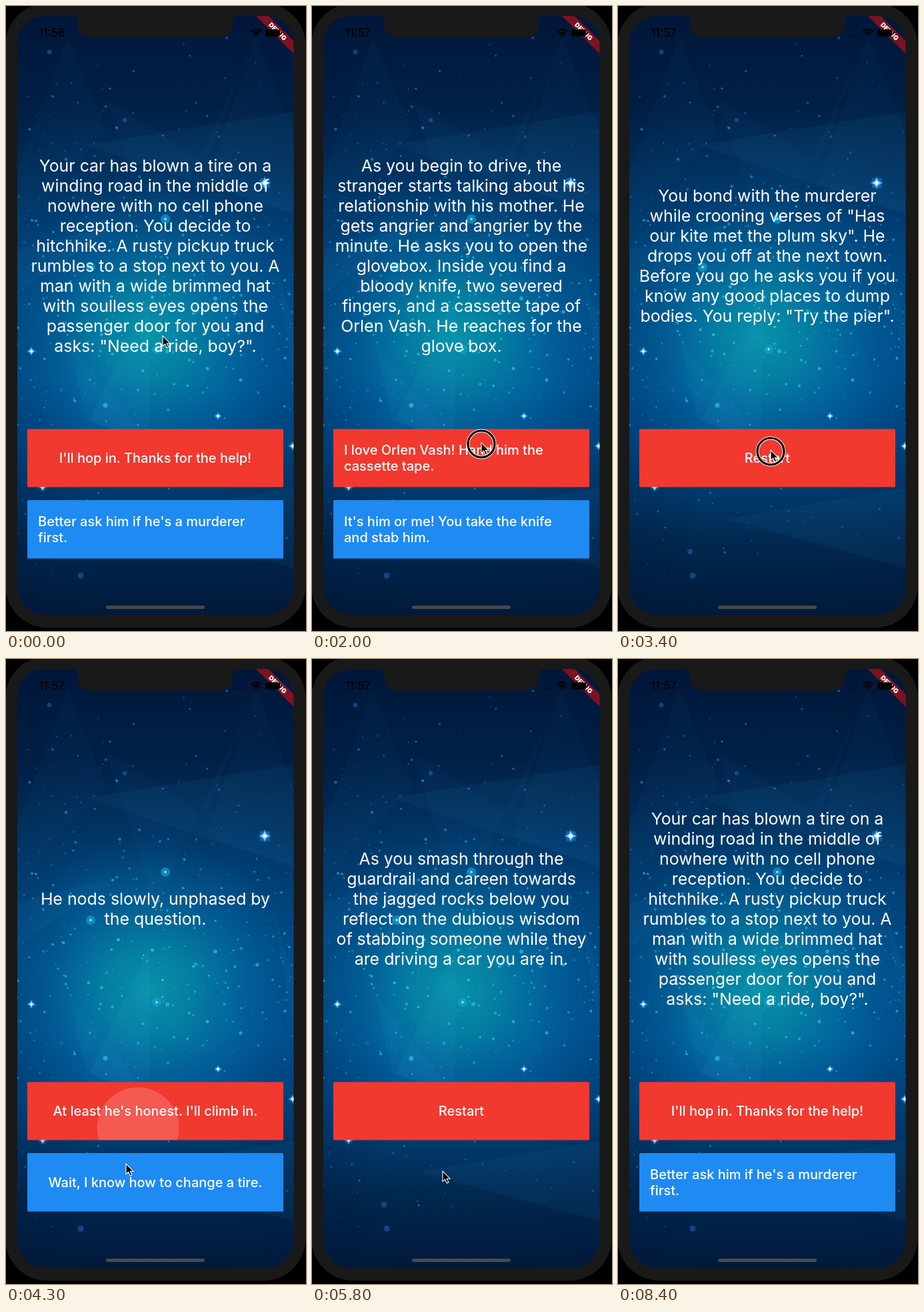
Write an HTML page that moves like this. It is 450 by 936 pixels and loops after 8.5 s.

```html
<!DOCTYPE html>
<html lang="en">
<head>
<meta charset="utf-8">
<title>Story game</title>
<style>
  html, body { margin: 0; width: 100%; height: 100%; overflow: hidden; background: #000; }
  svg { display: block; width: 450px; height: 936px; font-family: Inter, "Open Sans", sans-serif; }
  .story { font-size: 24.9px; fill: #fff; text-anchor: middle; }
  .choice { font-size: 20px; font-weight: 500; fill: #fff; }
  .centered { text-anchor: middle; }
  .clock { font-size: 16.8px; font-weight: 500; text-anchor: middle; }
  .debug { font-size: 9.6px; font-weight: 900; fill: #fff; text-anchor: middle; }
</style>
</head>
<body>
<svg viewBox="0 0 450 936">
  <defs>
    <linearGradient id="sky" x1="0" y1="15" x2="0" y2="911" gradientUnits="userSpaceOnUse">
      <stop offset="0" stop-color="#01173a"/>
      <stop offset=".15" stop-color="#012046"/>
      <stop offset=".27" stop-color="#013463"/>
      <stop offset=".38" stop-color="#014a83"/>
      <stop offset=".49" stop-color="#005795"/>
      <stop offset=".61" stop-color="#005898"/>
      <stop offset=".71" stop-color="#004b89"/>
      <stop offset=".79" stop-color="#013a6d"/>
      <stop offset=".88" stop-color="#01284e"/>
      <stop offset="1" stop-color="#01193c"/>
    </linearGradient>
    <radialGradient id="teal" cx="215" cy="495" r="225" gradientUnits="userSpaceOnUse">
      <stop offset="0" stop-color="#0aa0ac" stop-opacity=".82"/>
      <stop offset=".3" stop-color="#0896aa" stop-opacity=".6"/>
      <stop offset=".65" stop-color="#0780aa" stop-opacity=".25"/>
      <stop offset="1" stop-color="#0670aa" stop-opacity="0"/>
    </radialGradient>
    <linearGradient id="edges">
      <stop offset="0" stop-color="#001238" stop-opacity=".2"/>
      <stop offset=".25" stop-color="#001238" stop-opacity="0"/>
      <stop offset=".75" stop-color="#001238" stop-opacity="0"/>
      <stop offset="1" stop-color="#001238" stop-opacity=".15"/>
    </linearGradient>
    <radialGradient id="glow">
      <stop offset="0" stop-color="#4cc6ff" stop-opacity=".9"/>
      <stop offset="1" stop-color="#1a7bea" stop-opacity="0"/>
    </radialGradient>
    <clipPath id="screen"><rect x="17" y="15" width="414.500" height="896.500" rx="41"/></clipPath>
    <clipPath id="redClip"><rect x="32" y="633.500" width="384" height="87"/></clipPath>
    <clipPath id="blueClip"><rect x="32" y="740" width="384" height="87.500"/></clipPath>
  </defs>

  <rect width="450" height="936"/>
  <rect x="-1" y="-4" width="450.500" height="935" rx="63" fill="#191919"/>
  <path d="M449.500 184V276" stroke="#070707"/>

  <g clip-path="url(#screen)">
    <rect x="17" y="15" width="415" height="897" fill="url(#sky)"/>
    <rect x="17" y="15" width="415" height="897" fill="url(#teal)"/>
    <rect x="17" y="15" width="415" height="897" fill="url(#edges)"/>
    <g fill="#38a6e0" fill-opacity=".05">
      <path d="M120 208L432 158V312Z"/>
      <path d="M150 138L216 345H236L375 45L300 235Z" fill-opacity=".03"/>
      <path d="M375 45L432 190V310L300 265Z" fill-opacity=".03"/>
      <path d="M92 45L17 250V330L150 190Z" fill-opacity=".03"/>
      <path d="M17 365L170 325L17 430Z"/>
      <path d="M216 430L125 620L214 655Z" fill-opacity=".08"/>
      <path d="M95 505L215 655L120 620Z"/>
      <path d="M160 768L432 722V842Z" fill-opacity=".06"/>
      <path d="M400 370L432 480V560Z"/>
    </g>
    <g id="stars"></g>
    <rect x="32" y="633.500" width="384" height="87" rx="1.500" fill="#f1392f"/>
    <rect id="blue" x="32" y="740" width="384" height="87.500" rx="1.500" fill="#1e8af2"/>
    <circle id="ripple" r="61.500" fill="#fff" fill-opacity=".17"/>
    <g id="scenes"></g>

    <g transform="translate(407.500 38) rotate(45)">
      <rect x="-60" y="-6.700" width="120" height="13.400" fill="#7d1220"/>
      <text class="debug" y="3.600">DEBUG</text>
    </g>
    <text id="clock" class="clock" x="68.500" y="46"></text>
    <path id="signal" d="M344 44h2m3 0h2m3 0h2m3 0h2" stroke="#000" stroke-opacity=".65" stroke-width="2"/>
    <g fill="none" stroke="#000" stroke-width="2.600">
      <path d="M367.500 38.500Q375 31.500 382.500 38.500M370.300 41.700Q375 37.500 379.700 41.700"/>
      <path d="M375 46l-2.300-2.600q2.300-1.700 4.600 0z" fill="#000" stroke="none"/>
    </g>
    <rect x="389" y="35" width="22" height="10.500" rx="3"/>
    <path d="M412.500 38.500v4" stroke="#000" stroke-width="1.500"/>
    <rect x="150" y="898" width="148" height="5" rx="2.500" fill="#48494b"/>
  </g>
  <path d="M101 14V15Q108 15 108 22V25Q108 47.500 130 47.500H318Q340 47.500 340 25V22Q340 15 347 15V14Z" fill="#191919"/>

  <g id="pointer">
    <g id="ring" fill="none">
      <circle cy="2" r="20" stroke="#fff" stroke-width="5"/>
      <circle cy="2" r="20" stroke="#000" stroke-width="3.200"/>
    </g>
    <path d="M0 0V15.500L3.600 12.200L6.200 18L8.800 16.800L6.300 11.200H11Z" stroke="#fff" stroke-width="1.100"/>
  </g>
</svg>
<script>
const $ = id => document.getElementById(id);
const LOOP = 8500, STEP = 100;

const scenes = [
  { story: ["Your car has blown a tire on a", "winding road in the middle of", "nowhere with no cell phone",
      "reception. You decide to", "hitchhike. A rusty pickup truck", "rumbles to a stop next to you. A",
      "man with a wide brimmed hat", "with soulless eyes opens the", "passenger door for you and",
      'asks: "Need a ride, boy?".'],
    red: ["I'll hop in. Thanks for the help!"],
    blue: ["Better ask him if he's a murderer", "first."] },
  { story: ["He nods slowly, unphased by", "the question."],
    red: ["At least he's honest. I'll climb in."],
    blue: ["Wait, I know how to change a tire."] },
  { story: ["As you begin to drive, the", "stranger starts talking about his", "relationship with his mother. He",
      "gets angrier and angrier by the", "minute. He asks you to open the", "glovebox. Inside you find a",
      "bloody knife, two severed", "fingers, and a cassette tape of", "Orlen Vash. He reaches for the",
      "glove box."],
    red: ["I love Orlen Vash! Hand him the", "cassette tape."],
    blue: ["It's him or me! You take the knife", "and stab him."] },
  { story: ["You bond with the murderer", 'while crooning verses of "Has', 'our kite met the plum sky". He',
      "drops you off at the next town.", "Before you go he asks you if you", "know any good places to dump",
      'bodies. You reply: "Try the pier".'],
    red: ["Restart"] },
  { story: ["As you smash through the", "guardrail and careen towards", "the jagged rocks below you",
      "reflect on the dubious wisdom", "of stabbing someone while they", "are driving a car you are in."],
    red: ["Restart"] }
];

// Each tap: ring while pressed, then a ripple, then the next scene.
const taps = [
  { at: 800, x: 214, y: 676, next: 2 },
  { at: 2000, x: 254, y: 654, next: 3 },
  { at: 3400, x: 229, y: 665, next: 0 },
  { at: 3800, x: 190, y: 775, next: 1 },
  { at: 4200, x: 198, y: 703, next: 2 },
  { at: 5000, x: 190, y: 780, next: 4 },
  { at: 7100, x: 243, y: 695, next: 0 }
];

// Pointer stops: time, x, y
const path = [
  [0, 235, 494], [300, 235, 494], [700, 214, 676], [1100, 214, 676], [1800, 254, 654], [2300, 254, 654],
  [3200, 229, 665], [3500, 229, 665], [3700, 190, 775], [3900, 190, 775], [4100, 198, 703], [4200, 198, 703],
  [4300, 180, 756], [4500, 180, 756], [4900, 190, 780], [5200, 190, 780], [5800, 196, 767], [6400, 196, 767],
  [7000, 243, 695], [7600, 243, 695]
];
const POINTER_HIDES = 7700;

const lines = (texts, cls, x, y, gap) =>
  texts.map((t, i) => `<text class="${cls}" x="${x}" y="${y + i * gap}">${t}</text>`).join("");

const choice = (texts, mid) => texts.length === 1
  ? lines(texts, "choice centered", 224, mid + 7, 24)
  : lines(texts, "choice", 48, mid - 5, 24);

$("scenes").innerHTML = scenes.map(s => "<g>" +
  lines(s.story, "story", 224, 383 - 15 * (s.story.length - 1), 30) +
  choice(s.red, 677) + (s.blue ? choice(s.blue, 784) : "") + "</g>").join("");

let seed = 41;
const random = () => (seed = seed * 16807 % 2147483647) / 2147483647;

const dot = (x, y, r, fill, opacity) =>
  `<circle cx="${x}" cy="${y}" r="${r}" fill="${fill}" opacity="${opacity}"/>`;

const sparkle = (x, y, r) => dot(x, y, r, "url(#glow)", .75) +
  `<path transform="translate(${x} ${y})" fill="#9fe2ff" opacity=".8" d="M0 ${-r}Q.3 -.3 ${r} 0Q.3 .3 0 ${r}Q-.3 .3 ${-r} 0Q-.3 -.3 0 ${-r}"/>` +
  dot(x, y, r / 4, "#fff", 1);

function drawStars() {
  let out = "";
  for (let i = 0; i < 380; i++) {
    const x = 17 + 414 * random();
    const y = 30 + 870 * (random() + random()) / 2;
    const near = Math.max(0, 1 - Math.hypot(x - 215, y - 480) / 420);
    const fill = `rgb(${30 + 30 * near},${100 + 115 * near},${190 + 40 * near})`;
    out += dot(x.toFixed(1), y.toFixed(1), (.8 + 1.5 * random() ** 2).toFixed(2), fill, (.35 + .5 * random()).toFixed(2));
  }
  for (const [x, y] of [[239, 319], [127, 391], [226, 514]])
    out += dot(x, y, 7, "#12a5d5", .65) + dot(x, y, 2, "#7de6f5", .9);
  for (const [x, y, r] of [[149, 598, 3.5], [242, 517, 3], [314, 438, 3], [377, 458, 2.5], [302, 543, 2.5], [352, 560, 2.5]])
    out += dot(x, y, r, "#35b7d8", .75);
  for (const [x, y, r] of [[178, 171, 3.2], [112, 853, 4.5], [108, 817, 4], [65, 69, 3.5], [83, 575, 3]])
    out += dot(x, y, r, "#2468c4", .5);
  out += `<rect x="381" y="258" width="15" height="15" fill="#1769d2" opacity=".5"/>`;
  for (const star of [[388, 265, 10], [38, 517, 7], [318, 614, 6], [430, 659, 7], [55, 720, 8]])
    out += sparkle(...star);
  $("stars").innerHTML = out;
}

function pointerAt(t) {
  const i = path.findIndex(p => p[0] > t);
  if (i < 0) return path[path.length - 1].slice(1);
  const [t0, x0, y0] = path[i - 1], [t1, x1, y1] = path[i];
  const u = (t - t0) / (t1 - t0), ease = u * u * (3 - 2 * u);
  return [x0 + (x1 - x0) * ease, y0 + (y1 - y0) * ease];
}

const show = (el, on) => el.setAttribute("display", on ? "inline" : "none");

function render(time) {
  const t = Math.floor(time % LOOP / STEP) * STEP;
  const current = taps.reduce((scene, tap) => t >= tap.at + 200 ? tap.next : scene, 0);
  [...$("scenes").children].forEach((g, i) => show(g, i === current));
  show($("blue"), scenes[current].blue);

  const late = t >= 1000;
  $("clock").textContent = late ? "11:57" : "11:56";
  show($("signal"), late);

  const rippling = taps.find(tap => t === tap.at + 100);
  show($("ripple"), rippling);
  if (rippling) {
    $("ripple").setAttribute("cx", rippling.x);
    $("ripple").setAttribute("cy", rippling.y);
    $("ripple").setAttribute("clip-path", `url(#${rippling.y < 730 ? "red" : "blue"}Clip)`);
  }

  show($("pointer"), t < POINTER_HIDES);
  show($("ring"), taps.some(tap => t === tap.at || t === tap.at - 100));
  $("pointer").setAttribute("transform", `translate(${pointerAt(t)})`);
}

drawStars();
const start = performance.now();
(function tick() {
  render(performance.now() - start);
  requestAnimationFrame(tick);
})();
</script>
</body>
</html>
```
